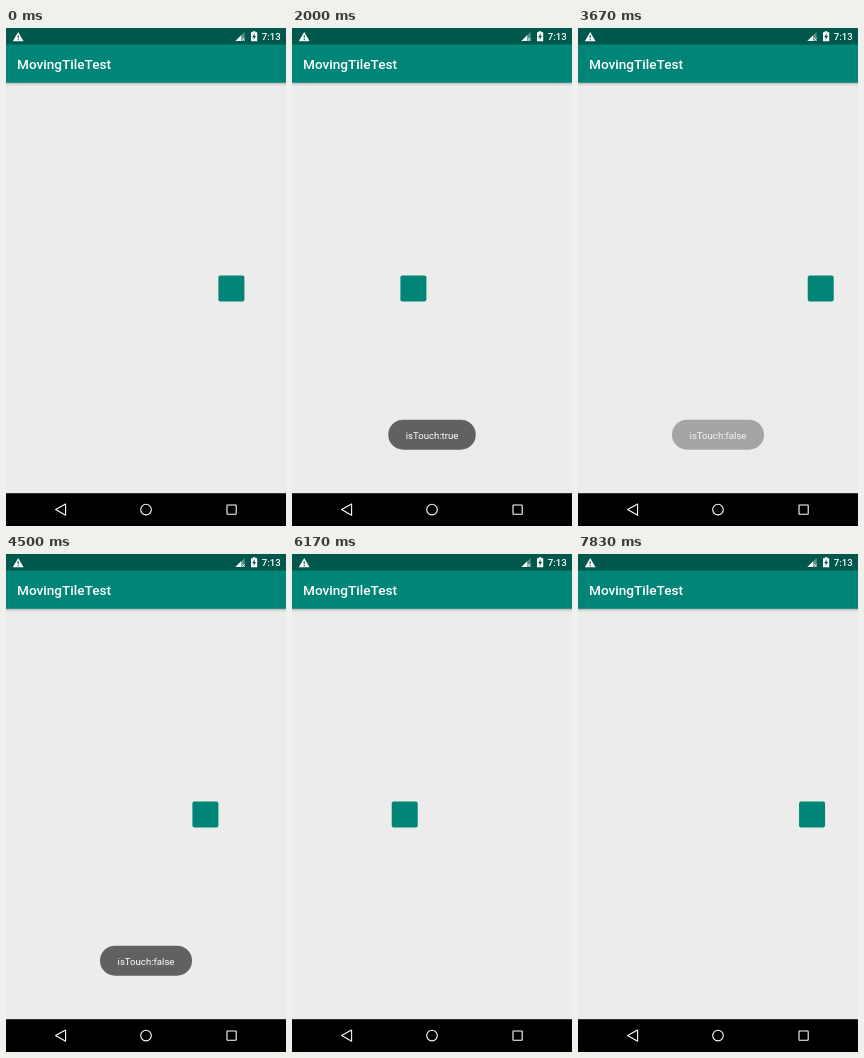
Write an HTML page that moves like this. It is 280 px wide and 498 px high and loops after 8 s.

```html
<!DOCTYPE html>
<html lang="en">
<head>
<meta charset="utf-8">
<title>Moving tile</title>
<style>
  html, body { margin: 0; width: 100%; height: 100%; overflow: hidden; background: #ececec; }
  svg { display: block; width: 100%; height: 100%; }
  text { font-family: Roboto, sans-serif; fill: #fff; }
  .line { fill: none; stroke: #fff; stroke-width: 1.1; stroke-linejoin: round; }
</style>
</head>
<body>
<svg viewBox="0 0 280 498">
  <defs>
    <linearGradient id="shade" x2="0" y2="1">
      <stop offset="0" stop-opacity=".3"/>
      <stop offset=".4" stop-opacity=".1"/>
      <stop offset="1" stop-opacity="0"/>
    </linearGradient>
  </defs>

  <rect width="280" height="498" fill="#ececec"/>

  <!-- app bar -->
  <rect y="54.5" width="280" height="4" fill="url(#shade)"/>
  <rect width="280" height="54.8" fill="#008577"/>
  <text x="11" y="41.4" font-size="13.6" font-weight="500">MovingTileTest</text>

  <!-- status bar -->
  <rect width="280" height="16.5" fill="#00574b"/>
  <path d="M12.2 4 17.6 13.2H6.8Z" fill="#fff"/>
  <path d="M12.2 7.2V10.2M12.2 11V12.2" stroke="#00574b" stroke-width="1.1"/>
  <path d="M238.6 4V13H229.4Z" fill="#fff" opacity=".35"/>
  <path d="M235.2 7.3V13H229.4Z" fill="#fff"/>
  <path d="M236.1 10.2 238.6 12.8M238.6 10.2 236.1 12.8" stroke="#fff" stroke-width=".8"/>
  <path d="M245 4.2H246.8V3.2H249.4V4.2H251.2V13.2H245Z" fill="#fff"/>
  <path d="M248.6 5.3 246.2 9.2H247.7V12L250 8.1H248.6Z" fill="#00574b"/>
  <text x="274.6" y="12.2" font-size="9.6" font-weight="500" text-anchor="end">7:13</text>

  <rect id="tile" y="247.6" width="26" height="26" rx="2" fill="#008577"/>

  <g id="toast" opacity="0">
    <rect id="pill" y="391.7" height="30" rx="15" fill="#616161"/>
    <text id="message" x="140" y="410.6" font-size="9.6" text-anchor="middle"></text>
  </g>

  <!-- navigation bar -->
  <rect y="465.2" width="280" height="32.8"/>
  <path class="line" d="M49.6 481.6 59.6 476V487.2Z"/>
  <circle class="line" cx="140" cy="481.6" r="5.3"/>
  <rect class="line" x="221" y="477" width="9.2" height="9.2" rx=".4"/>
</svg>
<script>
  const LOOP = 8000, STEP = 1000 / 6;
  const SWEEP = 24, WRAP_AT = 22, TRAVEL = 208, FIRST_X = 212.4;
  const FADE = 330;
  const toasts = [
    { from: 500, to: 2830, text: 'isTouch:true', width: 87.5 },
    { from: 3500, to: 5830, text: 'isTouch:false', width: 92 },
  ];
  const [tile, toast, pill, message] =
    ['tile', 'toast', 'pill', 'message'].map(id => document.getElementById(id));
  const clamp = v => Math.max(0, Math.min(1, v));

  function draw(ms) {
    // The 4 ms lead aligns thirds of a second with their rounded times.
    const step = Math.floor((ms % LOOP + 4) / STEP) % (2 * SWEEP);
    const phase = step % SWEEP;
    const lap = phase >= WRAP_AT ? 1 : 0;
    tile.setAttribute('x', FIRST_X + TRAVEL * (lap - phase / SWEEP));

    const time = step * STEP;
    const active = toasts.find(t => time >= t.from && time < t.to);
    toast.setAttribute('opacity', active
      ? clamp(Math.min(time - active.from, active.to - time) / FADE) : 0);
    if (active) {
      message.textContent = active.text;
      pill.setAttribute('x', 140 - active.width / 2);
      pill.setAttribute('width', active.width);
    }
  }

  const start = performance.now();
  function tick() {
    draw(performance.now() - start);
    requestAnimationFrame(tick);
  }
  tick();
</script>
</body>
</html>
```
